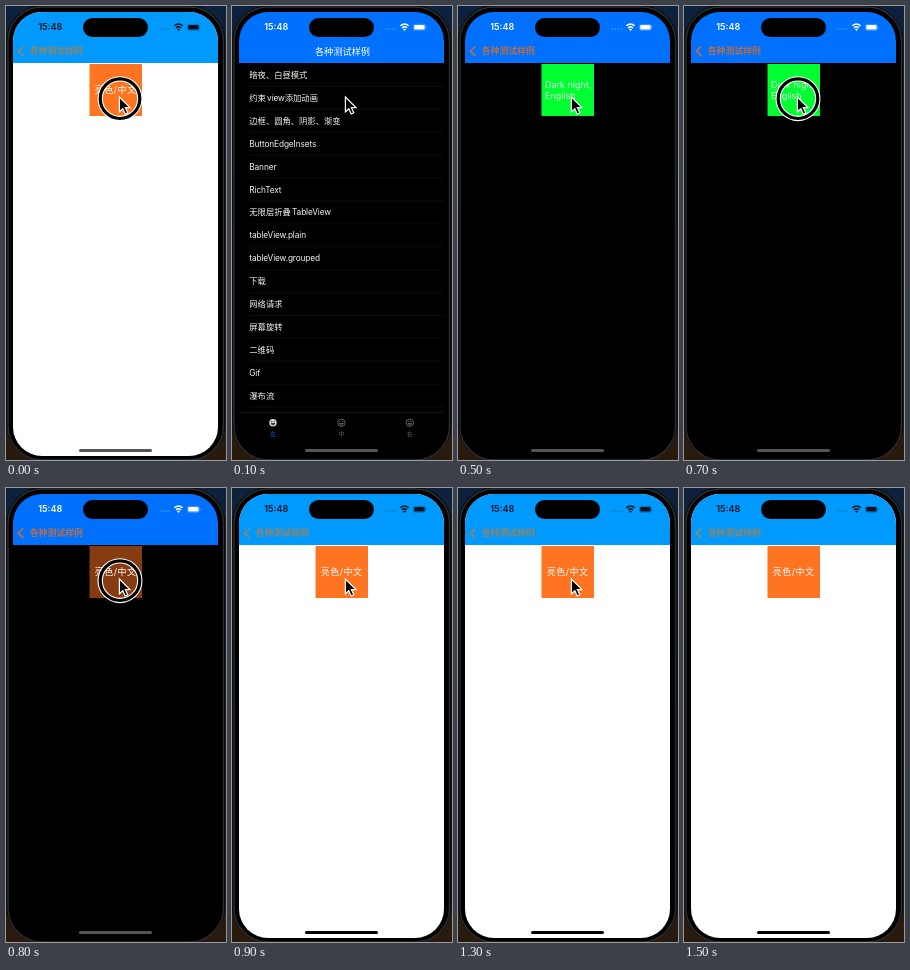
Write an HTML page that moves like this. It is 220 px wide and 454 px high and loops after 1.6 s.

```html
<!DOCTYPE html>
<html lang="zh-CN">
<head>
<meta charset="utf-8">
<style>
html, body { margin: 0; width: 100%; height: 100%; overflow: hidden; background: #000; }
svg { display: block; width: 220px; height: 454px; font-family: Inter, "Noto Sans CJK SC", "Noto Sans CJK", sans-serif; }
.mid { text-anchor: middle; }
.latin { letter-spacing: -.13px; }
#status { fill: var(--ink); }
</style>
</head>
<body>
<svg id="stage" viewBox="0 0 220 454">
  <defs>
    <linearGradient id="wall" x2="0" y2="1">
      <stop stop-color="#0c213d"/><stop offset=".5" stop-color="#221e1a"/><stop offset="1" stop-color="#2a1a0d"/>
    </linearGradient>
    <clipPath id="screen"><rect x="7" y="6" width="205" height="444" rx="29"/></clipPath>
  </defs>
  <rect width="220" height="454" fill="url(#wall)"/>
  <rect x=".5" y="-.5" width="218.5" height="455" rx="36" fill="#000" stroke="#0d0e0f"/>
  <rect x="2" y="1" width="215.5" height="453" rx="34" fill="#000" stroke="#2c2e30" stroke-width="1.4"/>
  <g clip-path="url(#screen)">
    <rect id="page" x="7" y="6" width="205" height="444"/>
    <rect id="bar" x="7" y="6" width="205" height="51"/>
    <g id="list">
      <text class="mid" x="110.5" y="48.5" font-size="9.2" font-weight="500" fill="#fff">各种测试样例</text>
      <g id="rows" font-size="8.3" fill="#f4f4f4"></g>
      <path d="M7 406.5H212" stroke="#121213"/>
      <g id="tabs" font-size="5.5" class="mid"></g>
    </g>
    <g id="detail">
      <g id="back">
        <path d="M17.3 40.3L12.5 45.2L17.3 50" fill="none" stroke="currentColor" stroke-width="1.8"/>
        <text x="23.7" y="48.4" font-size="8.9" font-weight="700" fill="currentColor">各种测试样例</text>
      </g>
      <rect id="box" x="83.5" y="58" width="52.5" height="52"/>
      <text id="chinese" class="mid" x="109.7" y="87.3" font-size="9" letter-spacing=".5" fill="#fff">亮色/中文</text>
      <text id="english" font-size="9" fill="#d8ffdf"><tspan x="87" y="82">Dark night,</tspan><tspan x="87" y="93">English</tspan></text>
    </g>
    <rect id="home" x="73" y="443" width="73" height="3" rx="1.5"/>
  </g>
  <rect x="77" y="12" width="65" height="19" rx="9.5" fill="#000"/>
  <g id="status">
    <text x="32.3" y="24.4" font-size="9" font-weight="600">15:48</text>
    <path d="M153.5 23.2H164" stroke="var(--ink)" stroke-width="1.2" stroke-dasharray="1.4 1.6" opacity=".3"/>
    <path d="M168.3 19.8Q172.5 16.2 176.7 19.8M170 21.9Q172.5 19.8 175 21.9" fill="none" stroke="var(--ink)" stroke-width="1.4"/>
    <path d="M171 23.2Q172.5 22 174 23.2L172.5 24.9Z"/>
    <rect x="181.4" y="18.3" width="12" height="6" rx="1.9" fill="none" stroke="var(--ink)" stroke-width=".7" opacity=".35"/>
    <rect x="182.2" y="19" width="10.4" height="4.6" rx="1.2"/>
    <path d="M194.5 20.1Q196 21.3 194.5 22.5Z" opacity=".4"/>
  </g>
  <g id="ring" fill="none">
    <circle cx="114" cy="92.7" r="19.8" stroke="#fff" stroke-width="5.4"/>
    <circle cx="114" cy="92.7" r="19.8" stroke="#000" stroke-width="3.2"/>
  </g>
  <path id="cursor" d="M113.4 91V105.8L116.8 102.7L119.2 108L121.8 106.8L119.4 101.7H124Z" fill="#000" stroke="#fff" stroke-width="1.2"/>
</svg>
<script>
const $ = id => document.getElementById(id);
const items = ['暗夜、白昼模式', '约束view添加动画', '边框、圆角、阴影、渐变', 'ButtonEdgeInsets', 'Banner',
  'RichText', '无限层折叠TableView', 'tableView.plain', 'tableView.grouped', '下载', '网络请求', '屏幕旋转',
  '二维码', 'Gif', '瀑布流'];
// Latin runs are set a little tighter, with a small gap after Chinese text.
const setLatin = label => label.replace(/[a-z.]+/gi, (word, at) =>
  `<tspan class="latin" dx="${at ? 1.2 : 0}">${word}</tspan>`);
$('rows').innerHTML = items.map((label, i) => {
  const y = 69 + i * 22.9;
  return `<text x="17.3" y="${y + 3}">${setLatin(label)}</text><path d="M17 ${y + 11.5}H212" stroke="#101011" stroke-width=".8"/>`;
}).join('');
$('tabs').innerHTML = ['左', '中', '右'].map((label, i) => {
  const x = 41 + i * 68.4, on = i === 0, line = on ? '#000' : '#777';
  return `<circle cx="${x}" cy="416.8" r="3.7" fill="${on ? '#ddd' : 'none'}" stroke="${on ? 'none' : line}" stroke-width=".8"/>
    <path d="M${x - 2} 415.6h1.3M${x + .7} 415.6h1.3M${x - 2} 417.6q2 3 4 0z" fill="none" stroke="${line}" stroke-width=".8"/>
    <text x="${x}" y="430" fill="${on ? '#0a70ff' : '#6c6c6c'}">${label}</text>`;
}).join('');

const dark = { page: '#000', bar: '#0070ff', ink: '#fff', back: '#b06f50', home: '#555' };
const light = { page: '#fff', bar: '#009aff', ink: '#07121c', back: '#8f8468', home: '#000', box: '#ff7420' };
const scenes = [
  [0, { ...light, home: '#555', ring: true }],
  [100, { ...dark, list: true }],
  [300, { ...dark, list: true, ring: true }],
  [400, { ...dark, box: '#00ff30', english: true }],
  [700, { ...dark, box: '#00ff30', english: true, ring: true }],
  [800, { ...dark, box: '#873b10', ring: true }],
  [900, light],
  [1400, { ...light, noCursor: true }]
];
const show = (id, on) => $(id).style.display = on ? '' : 'none';

function draw(now) {
  const time = now % 1600;
  const s = scenes.findLast(([start]) => start <= time)[1];
  $('stage').style.setProperty('--ink', s.ink);
  for (const id of ['page', 'bar', 'home', 'box']) $(id).style.fill = s[id] || 'none';
  $('back').style.color = s.back;
  show('list', s.list);
  show('detail', !s.list);
  show('english', s.english);
  show('chinese', !s.english);
  show('ring', s.ring);
  show('cursor', !s.noCursor);
}
const begin = performance.now();
function tick() {
  draw(performance.now() - begin);
  requestAnimationFrame(tick);
}
tick();
</script>
</body>
</html>
```
